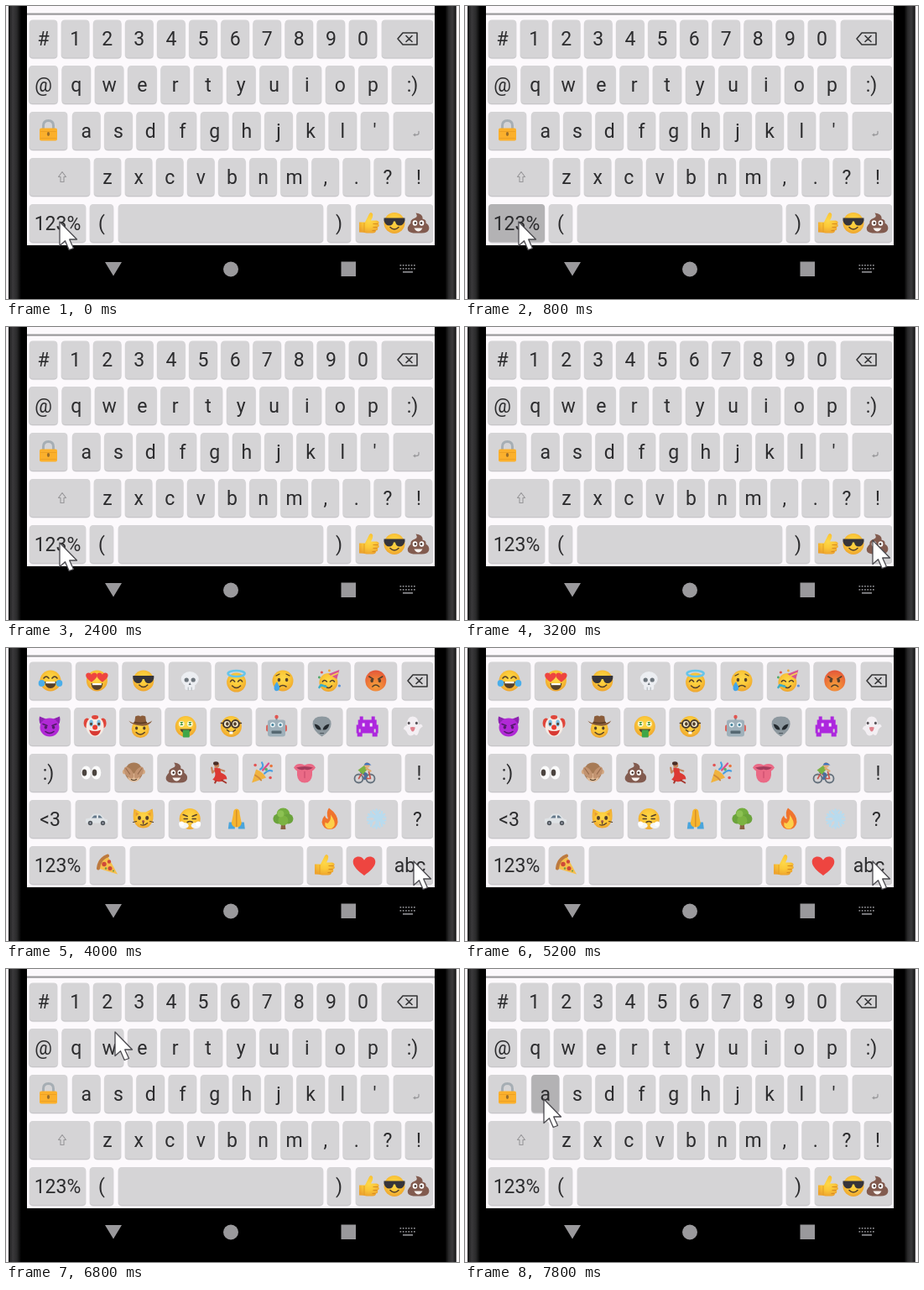
An HTML page for the animation above (8000 ms loop, 540 px wide and 349 px high).

```html
<!DOCTYPE html>
<html lang="en">
<head>
<meta charset="utf-8">
<title>Phone keyboard</title>
<style>
html, body { margin: 0; width: 100%; height: 100%; overflow: hidden; background: #faf5f8; }
svg { display: block; width: 100vw; height: 100vh; }
text { font: 23px Roboto, sans-serif; fill: #2c2c2e; text-anchor: middle; }
</style>
</head>
<body>
<svg id="stage" viewBox="0 0 540 349"></svg>
<script>
const KEY = '#d5d4d6', DOWN = '#b3b2b4';
const INK = '#54402b', GREY = '#9a999c';
const ROWS = [16.5, 71, 126, 181, 236];

// Drawing helpers; every pictogram is centred on 0,0 and about 26 px wide.
const dot = (x, y, r, fill, ry = r) => `<ellipse cx="${x}" cy="${y}" rx="${r}" ry="${ry}" fill="${fill}"/>`;
const shape = (d, fill) => `<path d="${d}" fill="${fill}"/>`;
const line = (d, color, w = 1.6) =>
  `<path d="${d}" fill="none" stroke="${color}" stroke-width="${w}" stroke-linecap="round" stroke-linejoin="round"/>`;
const box = (x, y, w, h, fill, r = 0) => `<rect x="${x}" y="${y}" width="${w}" height="${h}" rx="${r}" fill="${fill}"/>`;
const pair = f => f(-1) + f(1);
const face = (fill = 'url(#sun)', r = 12.5) => dot(0, 0, r, fill);
const eyes = (y = -2, r = 1.8, fill = INK) => pair(s => dot(s * 4.6, y, r, fill, r * 1.2));
const smile = (y = 4, w = 5) => line(`M${-w} ${y}Q0 ${y + 5} ${w} ${y}`, INK);
const heart = (x, y, k, fill = '#ee4540') =>
  `<path transform="translate(${x} ${y}) scale(${k})" d="M0 12C-7 7-14 1-14-5C-14-13-3-14 0-7C3-14 14-13 14-5C14 1 7 7 0 12Z" fill="${fill}"/>`;
const grin = y => shape(`M-7 ${y}H7Q6 ${y + 8} 0 ${y + 8}T-7 ${y}Z`, INK) + box(-5.5, y, 11, 2.2, '#fff');

const icons = {
  joy: face() + line('M-8-3Q-5-7-2-3M2-3Q5-7 8-3', INK) + grin(1) + pair(s => dot(s * 10.5, 3, 3.8, '#4aaeea', 4)),
  love: face() + pair(s => heart(s * 6.5, -4, .48)) + grin(3),
  cool: face() + shape('M-12.5-6H12.5V-3Q11 3 6 3Q2 3 1-2H-1Q-2 3-6 3Q-11 3-12.5-3Z', '#35343a') + smile(5),
  skull: dot(0, -2, 10.5, '#eceef2', 9) + box(-6, 3, 12, 8, '#eceef2', 2) + pair(s => dot(s * 4, -1, 2.6, '#6d757c')) +
    shape('M0 2L-1.5 5H1.5Z', '#6d757c') + line('M-2 8V11M2 8V11', '#a9b0b5', 1),
  halo: `<g transform="translate(0 2)">${face('url(#sun)', 11.5)}</g>` + `<ellipse cy="-8.5" rx="10" ry="3.5" fill="none" stroke="#67c5ea" stroke-width="2.6"/>` +
    line('M-7 1Q-5-3-2 1M2 1Q5-3 7 1', INK) + smile(6),
  cry: face() + eyes(-1) + line('M-8-6L-4-8M8-6L4-8', INK, 1.2) + line('M-4 7Q0 4 4 7', INK) + shape('M-7 1Q-13 8-9 12Q-3 13-4 7Z', '#45a6e8'),
  party: `<g transform="translate(-1 2)">${face('url(#sun)', 11)}${line('M-7-1Q-5-4-2-1M2-1Q5-4 7-1', INK)}${smile(4, 4)}</g>` +
    shape('M12-13L9-2L-1-8Z', '#d9558f') + line('M10-9L3-6', '#f5d351', 1.8) + line('M-4 7L-10 5L-12 8', '#3faec6', 2.4) +
    dot(-9, -10, 1.6, '#e2584f') + dot(-12, -4, 1.4, '#4fa866') + dot(12, 6, 1.6, '#588fd8') + dot(0, -12, 1.4, '#f0a832'),
  angry: face('url(#rage)') + line('M-8-5L-3-2M8-5L3-2', INK) + eyes(0) + line('M-4 7Q0 3 4 7', INK),
  devil: shape('M-12-12Q-14-4-8 0L-2-8ZM12-12Q14-4 8 0L2-8Z', '#8d22b0') +
    dot(0, 1, 11.5, '#b129d6', 11) + line('M-8-3L-3-1M8-3L3-1', '#541a6c') + eyes(1, 1.7, '#541a6c') + line('M-5 6Q0 10 5 6', '#541a6c'),
  clown: pair(s => dot(s * 9.5, -4, 4, '#e0453a', 6)) + dot(0, 0, 10.5, '#f6ebe4', 12) + dot(0, -11, 4, '#e0453a', 2.4) +
    pair(s => dot(s * 4.5, -4, 2.3, '#7bbfe2', 4)) + eyes(-3, 1.4) + dot(0, 1, 3, '#e83d32') + shape('M-7 4Q0 7 7 4Q5 11 0 11T-7 4Z', '#d83a34'),
  cowboy: dot(0, 3, 10.5, 'url(#sun)') + eyes(2, 1.6) + smile(7, 5) +
    shape('M-14-7Q-8-3-7-5L-6-12Q-2-14 0-12Q2-14 6-12L7-5Q8-3 14-7Q11 0 0-1T-14-7Z', '#8a5c3a') + line('M-7-5Q0-3 7-5', '#5d3c22'),
  money: face() + pair(s => dot(s * 5, -3, 3.4, '#fff6cf') + line(`M${s * 5 + 1.3}-5H${s * 5 - 1}L${s * 5 + 1}-2H${s * 5 - 1.3}`, '#3b9340', 1.2)) +
    shape('M-7 3H7Q5 8 0 8T-7 3Z', INK) + box(-3.5, 4, 8, 9, '#3fa648', 1),
  nerd: face() + pair(s => `<circle cx="${s * 5}" cy="-3" r="4.4" fill="#f4ecd2" stroke="#48392c" stroke-width="2"/>`) +
    eyes(-3, 1.8) + line('M-12-4H-10M10-4H12', '#48392c') + smile(4) + box(-2, 6, 4, 3, '#fff'),
  robot: box(-1, -12, 2, 5, '#778a95') + dot(0, -11.5, 2.2, '#e25550') + box(-12.5, -2, 25, 8, '#d9665e', 2) + box(-10.5, -8, 21, 20, '#9fb0ba', 3) +
    pair(s => dot(s * 4.6, -2, 3, '#e9f2f5') + dot(s * 4.6, -2, 1.5, '#3f7f99')) + box(-6, 5, 12, 3.5, '#566872', 1),
  alien: shape('M0 12Q-11 5-11-3Q-11-12 0-12T11-3Q11 5 0 12Z', '#8d989f') + shape('M-9-3Q-2-2-1 4Q-7 5-9-3ZM9-3Q2-2 1 4Q7 5 9-3Z', '#23292e') + line('M-2 8H2', '#4c565c', 1),
  invader: shape('M-9-12H-5V-8H5V-12H9V-8H11V-2H13V8H10V3H8V7H12V12H6V8H-6V12H-12V7H-8V3H-10V8H-13V-2H-11V-8H-9Z', '#ad27de') + pair(s => box(s * 4.5 - 1.5, -4, 3, 4, '#f3e4fa')),
  ghost: shape('M-6 9Q-8 4-11 3Q-10-1-7-1Q-7-12 0-12T7-2Q11-4 12 0Q8 2 7 7Q5 13 2 9Q-3 13-6 9Z', '#f3eff3') +
    eyes(-4, 1.5, '#575358') + shape('M-3 1Q0 0 3 1Q2 6 0 6T-3 1Z', '#e0808c'),
  look: pair(s => dot(s * 6, 0, 5.8, '#fbfbfb', 8) + dot(s * 6 - 2, 0, 2.8, '#4b443f', 4)),
  monkey: pair(s => dot(s * 10.5, -1, 3, '#d3a983')) + dot(0, -1, 10.5, '#a77b56', 11) + dot(0, 6, 7, '#e0bb98', 5) +
    line('M-3 8Q0 10 3 8', INK, 1.2) + pair(s => `<g transform="rotate(${s * 35} ${s * 6} 0)">${dot(s * 6, 0, 4.2, '#c29370', 8)}${line(`M${s * 6}-6V2`, '#94694a', 1)}</g>`),
  poop: shape('M-3-12Q6-11 5-5Q10-4 9 0Q14 3 12.500 8Q11 12 4 12H-6Q-14 11-12.500 5Q-11 2-9 0Q-10-4-4-6Q0-7-3-12Z', '#825b4f') +
    pair(s => dot(s * 4, 0, 2.8, '#fff', 3.2) + dot(s * 3.6, 0, 1.3, '#3d2a24')) + shape('M-5 6H5Q3 10 0 10T-5 6Z', '#f6f1ee'),
  dancer: line('M-4-4L-8 0L-9-6M0-4L6-2', '#c4845c', 2.2) + dot(-3, -9, 3, '#c4845c', 3.4) + dot(-4, -11, 3.2, '#4a2d26', 2.2) +
    shape('M-6-6L1-5L2 0Q10 3 9 8Q5 7 4 10Q-4 12-8 8Q-4 5-5 0Z', '#dc3a34') + line('M3 9L8 12M-4 10L-5 12', '#a5382f', 2),
  popper: shape('M-12 12L-7-4Q1-1 5 6Z', '#f0b340') + line('M-8 3Q-3 6-1 9', '#cf8a3a', 2) + line('M-2-4Q3-7 0-12M3 1Q8-4 12-2', '#4a9fe0', 2.2) +
    line('M1-3L8-11', '#de4c8b', 2.2) + dot(-8, -9, 1.8, '#e35353') + dot(5, -4, 1.8, '#5ab16b') + dot(11, -8, 1.8, '#e8743b') + dot(10, 6, 1.8, '#e35353'),
  tongue: shape('M-13-6Q-9-13 0-9Q9-13 13-6Q11-3 9-2V3Q8 12 0 12T-9 3V-2Q-11-3-13-6Z', '#ea6a86') + shape('M-10-6Q0-9 10-6Q5-2 0-4Q-5-2-10-6Z', '#a33c5c') + line('M0-1V6', '#cf5272', 1.4),
  bike: pair(s => `<circle cx="${s * 7}" cy="7" r="5" fill="none" stroke="#64707c" stroke-width="1.8"/>`) +
    line('M-7 7L-3 0L3 7L7 7L5-1', '#c9564c') + line('M-4-1L2 2L0 7', '#4a6f9c', 3.4) + shape('M-8-3L0-9L4-5L-2 2Z', '#7cb342') +
    line('M2-5L7-2', '#e0a873', 2.2) + dot(3, -9, 3.2, '#e5b07e') + shape('M-1-9Q2-15 8-9Z', '#3f74c0'),
  car: shape('M-13 5V0L-8-1L-4-6H4L10 0L13 1V5Z', '#dfe3e6') + shape('M-6-1L-3-4H0V-1ZM2-4H4L7-1H2Z', '#64788a') + pair(s => dot(s * 7.5, 5, 2.7, '#50575d') + dot(s * 7.5, 5, 1, '#aab')),
  cat: shape('M-11-12L-3-8H3L11-12Q13-2 11 3Q8 11 0 11T-11 3Q-13-2-11-12Z', 'url(#sun)') + shape('M-9-8L-5-6L-9-3ZM9-8L5-6L9-3Z', '#e89a33') +
    eyes(-1, 2) + dot(0, 3, 1.6, '#a25b49') + line('M0 4V6M-3 7Q1 9 5 5M-12 4L-8 3M12 4L8 3', INK, 1.1),
  huff: face() + line('M-8-5L-3-3M8-5L3-3M-7 0H-3M3 0H7', INK) + line('M-3 4Q0 2 3 4', INK) + pair(s => dot(s * 7, 8, 5.5, '#f4f6f8', 3.6) + dot(s * 10, 6, 3, '#fff')),
  pray: pair(s => shape(`M${s * 2} 4L${s * 9} 4L${s * 10} 12H${s * 2}Z`, '#4aa5dc')) +
    shape('M0-12Q4-12 4-5L6 5Q5 10 0 10T-6 5L-4-5Q-4-12 0-12Z', '#f6b52f') + line('M0-10V9', '#d28a26', 1.2),
  tree: shape('M-2 3H2L3 12.500H-3Z', '#8a6242') + dot(0, -5, 8, '#74ad3f') + pair(s => dot(s * 6, 0, 6, '#6ba33c')) + dot(0, 2, 6, '#7cb342') + dot(-3, -6, 4, '#8cc152'),
  fire: shape('M-1-13Q10-5 9.500 4Q8 12.500 0 12.500T-9.500 4Q-9-1-6-4Q-5 0-2 0Q-5-8-1-13Z', '#f0742d') + shape('M1-5Q7 3 5.500 8Q3 12 0 12Q-7 11-5.500 4Q-3 6-2 5Q2 1 1-5Z', '#fdd04a'),
  snow: [0, 60, 120].map(a => `<g transform="rotate(${a})">${line('M0-11V11M-4-10L0-6L4-10M-4 10L0 6L4 10M-4-5L0-1L4-5', '#b9dbee', 2.4)}</g>`).join(''),
  pizza: shape('M-11 4Q-10-7 0-11L12 11Z', '#f5bf4c') + line('M-11 4Q-10-7 0-11', '#bd7a3f', 4) + dot(-4, -1, 2.7, '#cf4a38') +
    dot(2, -4, 2.2, '#cf4a38') + dot(3, 4, 2.5, '#cf4a38') + dot(-2, 4, 1.2, '#6c9a48') + dot(7, 7, 1, '#6c9a48'),
  thumb: shape('M-12-1H-5L0-11Q2-14 4-11Q5-8 2-3H9Q13-2 11 1Q13 4 10 5Q11 9 8 9Q8 12 4 12H-3Q-7 11-12 11Z', 'url(#sun)') + line('M5 1H10M5 5H9M4 9H7', '#d78c20', 1.2) + line('M-6 0V10', '#e39d24', 1),
  heart: heart(0, 1, .95),
  lock: line('M-6 0V-6Q-6-12 0-12T6-6V0', '#a6aeb4', 3) + box(-10.5, -3, 21, 15, '#fbb02c', 2) + line('M-9 1H9M-9 9H9', '#eda023', 1) + dot(0, 4, 1.6, '#9a6d2a', 2.4),
  back: line('M-11.5 0L-5.5-7H11.500V7H-5.500ZM-1.500-3.500L5.500 3.500M5.500-3.500L-1.500 3.500', '#343436', 1.6),
  shift: line('M-2 6V0H-4.500L0-6L4.500 0H2V6Z', '#98979a', 1.1),
  enter: line('M3 1V3Q3 5 0 5H-2', GREY, 1.3) + shape('M-4 5L-1 3V7Z', GREY)
};

const icon = (name, x, y) => `<g transform="translate(${x} ${y})">${icons[name]}</g>`;

// A key's label is either text or an object of pictogram names with x offsets.
function key(x0, x1, row, label, id = '') {
  const y = ROWS[row], w = x1 - x0, h = 45, mid = (x0 + x1) / 2, cy = y + 22.5;
  const body = box(x0 - .8, y + .4, w + 1.6, h + 1.4, '#e6e4e7', 5) + box(x0, y + 1, w, h, '#c6c5c8', 4) +
    `<rect ${id && `id="${id}"`} x="${x0}" y="${y}" width="${w}" height="${h}" rx="4" fill="${KEY}"/>`;
  if (typeof label === 'string')
    return body + `<text x="${mid}" y="${cy + 8}">${label.replace('<', '&lt;')}</text>`;
  return body + Object.entries(label).map(([n, dx]) => icon(n, mid + dx, cy)).join('');
}
const run = (items, first, step, w, row, id) => items.map((s, i) => {
  const c = first + i * step;
  return key(c - w / 2, c + w / 2, row, s, i === 0 ? id : '');
}).join('');
const chars = s => [...s];
const pics = s => s.split(' ').map(n => ({ [n]: 0 }));

const layouts = {
  letters:
    run(chars('#1234567890'), 44.5, 38.1, 33, 0) + key(448, 509, 0, { back: 0 }) +
    run(chars('@qwertyuiop'), 44.5, 39.3, 34, 1) + key(460, 509, 1, ':)') +
    key(28, 73, 2, { lock: 0 }) + run(chars("asdfghjkl'"), 95.8, 38.2, 33, 2, 'keyA') + key(462, 509, 2, { enter: 3.5 }) +
    key(28, 100, 3, { shift: 3 }) + run(chars('zxcvbnm,.?!'), 121, 37.1, 32, 3) +
    key(28, 95, 4, '123%', 'keyNum') + key(100, 128, 4, '(') + key(134, 378, 4, '') +
    key(383, 411, 4, ')') + key(417, 509, 4, { thumb: -30, cool: 0, poop: 28.5 }, 'keyEmo'),
  numbers:
    run([...chars('#^!/*'), { back: 0 }], 66, 81, 76, 0) + run(chars('$789%~'), 66, 81, 76, 1) +
    run(chars('(456+)'), 66, 81, 76, 2) + run(chars('[123-]'), 66, 81, 76, 3) +
    run(['abc', '0', '.', '='], 65.5, 80.3, 75, 4, 'keyAbc') + key(350, 509, 4, { thumb: -35, cool: -5.5, poop: 23 }),
  emoji:
    run(pics('joy love cool skull halo cry party angry'), 53, 55.4, 50, 0) + key(472, 509, 0, { back: 0 }) +
    run(pics('devil clown cowboy money nerd robot alien invader ghost'), 52, 54.1, 49, 1) +
    key(28, 73, 2, ':)') + run(pics('look monkey poop dancer popper tongue'), 101.5, 50.9, 45, 2) +
    key(384, 471, 2, { bike: 0 }) + key(476, 509, 2, '!') +
    key(28, 77, 3, '<3') + run(pics('car cat huff pray tree fire snow'), 108, 55.6, 50, 3) + key(472, 509, 3, '?') +
    key(28, 95, 4, '123%') + key(100, 142, 4, { pizza: 0 }) + key(148, 354, 4, '') +
    key(359, 401, 4, { thumb: 0 }) + key(406, 448, 4, { heart: 0 }) + key(454, 509, 4, 'abc', 'keyBack')
};

const stops = colors => colors.map((c, i) => `<stop offset="${i / (colors.length - 1)}" stop-color="${c}"/>`).join('');
const defs = '<defs>' +
  `<linearGradient id="edge">${stops(['#161617', '#3a393b', '#2a2a2b', '#000'])}</linearGradient>` +
  `<radialGradient id="sun" cy=".4" r=".62">${stops(['#fdd84a', '#fbc838', '#eda32f'])}</radialGradient>` +
  `<radialGradient id="rage" cy=".75" r=".8">${stops(['#f5a03c', '#ee7a38', '#e2513a'])}</radialGradient></defs>`;

const phone = defs +
  box(0, 0, 540, 349, '#faf5f8') + box(3, 0, 533.5, 349, '#000') + box(3, 0, 15, 349, 'url(#edge)') +
  `<g transform="translate(536.5 0) scale(-1 1)">${box(0, 0, 13, 349, 'url(#edge)')}</g>` +
  box(25, 0, 486, 285, '#fcf9fc') + box(25, 8.5, 486, 2.2, GREY);

let dots = '';
for (let r = 0; r < 2; r++) for (let c = 0; c < 6; c++) dots += box(469.5 + c * 3.3, 308 + r * 4, 1.7, 1.7, '#8a8a8e');
const nav = shape('M118 305H138L128 321.5Z', GREY) + dot(268, 313.5, 9, GREY) +
  box(399.5, 304.5, 17.5, 17.5, GREY) + dots + box(473, 316, 12, 1.7, '#8a8a8e');

const pointer = `<g id="pointer"><path d="M0 0V28.5L6.5 22.8L11.2 33.500L16.5 31.500L11.7 21H20.5Z" fill="#fff" stroke="#4a494e" stroke-width="1.3" stroke-linejoin="round"/></g>`;

const $ = id => document.getElementById(id);
$('stage').innerHTML = phone +
  Object.entries(layouts).map(([n, s]) => `<g id="${n}">${s}</g>`).join('') + nav + pointer;

// The picture advances in ticks of 200 ms.
const TICK = 200, LOOP = 8000;
const presses = { 800: 'keyNum', 2000: 'keyAbc', 3800: 'keyEmo', 5400: 'keyBack', 7800: 'keyA' };
const wander = [[486, 254], [480, 265], [385, 150], [270, 60], [130, 75], [68, 140], [250, 200], [482, 236], [270, 38], [94, 155]];

function pointerAt(t) {
  if (t >= 6000) return wander[(t - 6000) / TICK];
  const u = Math.min(1, Math.max(0, (t - 2400) / 800));
  const e = u * u * (3 - 2 * u);
  return [64 + 422 * e, 257 - 3 * u - 96 * Math.sin(Math.PI * u)];
}

function layoutAt(t) {
  if (t >= 1000 && t < 2200) return 'numbers';
  return t >= 4000 && t < 5600 ? 'emoji' : 'letters';
}

function draw(ms) {
  const t = Math.floor(ms % LOOP / TICK) * TICK, shown = layoutAt(t);
  for (const n in layouts) $(n).style.display = n === shown ? '' : 'none';
  for (const k in presses) $(presses[k]).setAttribute('fill', +k === t ? DOWN : KEY);
  $('pointer').setAttribute('transform', `translate(${pointerAt(t)})`);
}

const start = performance.now();
function loop() {
  draw(performance.now() - start);
  requestAnimationFrame(loop);
}
loop();
</script>
</body>
</html>
```
